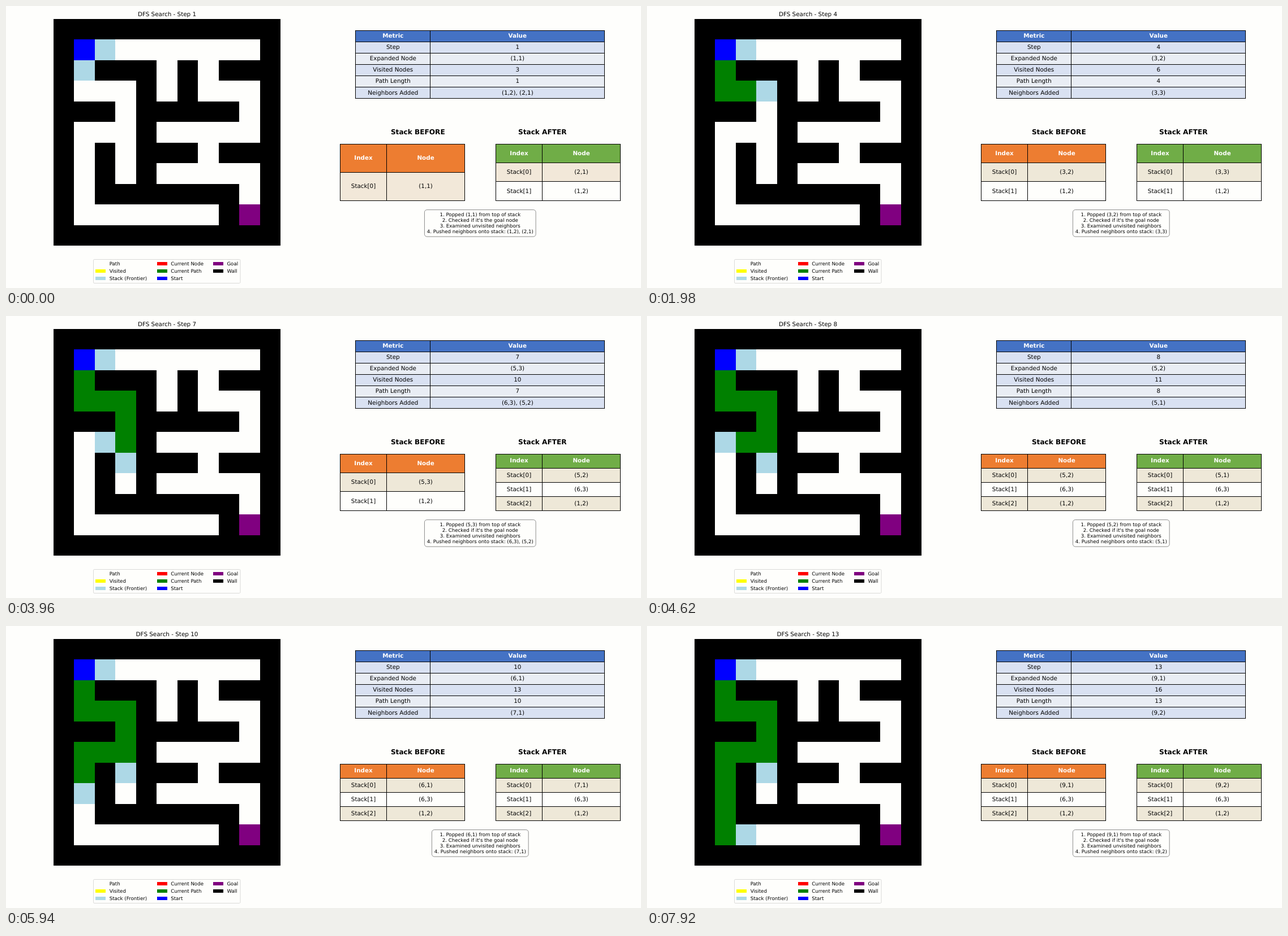
An HTML page with a canvas for the animation above (8 s loop, 1122x499 px).

```html
<!DOCTYPE html>
<html lang="en">
<head>
<meta charset="utf-8">
<title>DFS Search</title>
<style>
html, body { margin: 0; width: 100%; height: 100%; overflow: hidden; background: #fefefc; }
canvas { display: block; }
</style>
</head>
<body>
<canvas id="stage" width="1122" height="499"></canvas>
<script>
const ctx = document.getElementById('stage').getContext('2d');
const PAPER = '#fefefc';
const LOOP = 8000, STEP_MS = 660, STEPS = 13;
const PT = 0.8657;           // pixels per point
const SMALL = 10 * PT, BODY = 12 * PT, HEAD = 14 * PT;

const MAZE = [
  '###########',
  '#.........#',
  '#.###.#.###',
  '#...#.#...#',
  '###.#####.#',
  '#...#.....#',
  '#.#.###.###',
  '#.#.#.....#',
  '#.#######.#',
  '#.......#G#',
  '###########'
];
const MOVES = [[0, 1], [1, 0], [0, -1], [-1, 0]];
const name = ([r, c]) => `(${r},${c})`;

// Depth-first search, recording every step. The top of the stack comes first.
function search() {
  let stack = [[1, 1]];
  const seen = new Set(['(1,1)']), path = [], log = [];
  for (let n = 1; n <= STEPS; n++) {
    const before = stack, node = stack[0];
    const added = MOVES.map(([dr, dc]) => [node[0] + dr, node[1] + dc])
      .filter(p => MAZE[p[0]][p[1]] !== '#' && !seen.has(name(p)));
    added.forEach(p => seen.add(name(p)));
    path.push(node);
    stack = [...added].reverse().concat(stack.slice(1));
    log.push({ n, node, before, after: stack, path: [...path],
               visited: seen.size, added: added.map(name).join(', ') });
  }
  return log;
}
const log = search();

function text(str, x, y, size, align = 'center', bold = false, color = '#000') {
  ctx.font = `${bold ? 'bold ' : ''}${size}px "DejaVu Sans", sans-serif`;
  ctx.textAlign = align;
  ctx.fillStyle = color;
  ctx.fillText(str, x, y);
}

function rect(x, y, w, h, color) {
  ctx.fillStyle = color;
  ctx.fillRect(x, y, w, h);
}

function roundBox(x, y, w, h, r, edge) {
  ctx.beginPath();
  ctx.roundRect(x, y, w, h, r);
  ctx.fillStyle = PAPER;
  ctx.fill();
  ctx.strokeStyle = edge;
  ctx.lineWidth = 0.9;
  ctx.stroke();
}

function cell(r, c, color) {
  const px = k => Math.round(84 + k * 36.45), py = k => Math.round(23 + k * 36.45);
  rect(px(c), py(r), px(c + 1) - px(c), py(r + 1) - py(r), color);
}

function drawMaze(s) {
  text(`DFS Search - Step ${s.n}`, 284.5, 18, BODY);
  MAZE.forEach((row, r) => [...row].forEach((ch, c) =>
    cell(r, c, ch === '#' ? '#000' : ch === 'G' ? '#800080' : PAPER)));
  s.after.forEach(p => cell(...p, '#add8e6'));
  s.path.forEach(p => cell(...p, '#008000'));
  cell(1, 1, '#0000ff');
}

function table(x, y, w, h, split, rows, head, fills) {
  const rh = h / rows.length, mid = x + w * split;
  const left = Math.floor(x), top = Math.floor(y);
  const right = Math.floor(x + w), bottom = Math.floor(y + h);
  rows.forEach((row, i) => {
    const y0 = Math.floor(y + i * rh), y1 = Math.floor(y + (i + 1) * rh);
    rect(left, y0, right - left, y1 - y0, i ? fills[(i - 1) % 2] : head);
    const base = y + (i + 0.5) * rh + 0.276 * BODY;
    const color = i ? '#000' : '#fff';
    text(row[0], (x + mid) / 2, base, BODY, 'center', !i, color);
    text(row[1], (mid + x + w) / 2, base, BODY, 'center', !i, color);
  });
  for (let i = 0; i <= rows.length; i++)
    rect(left, Math.floor(y + i * rh), right - left + 1, 1, '#000');
  for (const v of [left, Math.floor(mid), right])
    rect(v, top, 1, bottom - top + 1, '#000');
}

function drawMetrics(s) {
  table(617.8, 43.2, 440, 120.5, 0.3, [
    ['Metric', 'Value'],
    ['Step', s.n],
    ['Expanded Node', name(s.node)],
    ['Visited Nodes', s.visited],
    ['Path Length', s.path.length],
    ['Neighbors Added', s.added]
  ], '#4472c4', ['#d9e1f2', '#e9edf4']);
}

function drawStack(title, x, titleX, stack, head, tint) {
  text(title, titleX, 227.2, HEAD, 'center', true);
  const rows = stack.map((p, i) => [`Stack[${i}]`, name(p)]);
  table(x, 244, 220, 100.4, 0.375, [['Index', 'Node'], ...rows], head, [tint, PAPER]);
}

function drawNotes(s) {
  const lines = [
    `1. Popped ${name(s.node)} from top of stack`,
    "2. Checked if it's the goal node",
    '3. Examined unvisited neighbors',
    `4. Pushed neighbors onto stack: ${s.added}`
  ];
  const cx = 837.8, pad = SMALL / 2;
  ctx.font = `${SMALL}px "DejaVu Sans", sans-serif`;
  const w = ctx.measureText(lines[3]).width + 2 * pad;
  roundBox(cx - w / 2, 360.6, w, 47.5, pad, '#808080');
  lines.forEach((line, i) => text(line, cx, 371.8 + i * 10.05, SMALL));
}

const LEGEND = [
  [158, 182.7, [['Path', PAPER], ['Visited', '#ffff00'], ['Stack (Frontier)', '#add8e6']]],
  [267, 291.2, [['Current Node', '#ff0000'], ['Current Path', '#008000'], ['Start', '#0000ff']]],
  [366, 390.4, [['Goal', '#800080'], ['Wall', '#000']]]
];

function drawLegend() {
  roundBox(154.5, 448.5, 259.5, 42, 1.7, '#d6d6d5');
  for (const [x, tx, items] of LEGEND)
    items.forEach(([label, color], i) => {
      rect(x, 453 + i * 13, 18, 6, color);
      text(label, tx, 459.2 + i * 13.1, SMALL, 'left');
    });
}

function draw(t) {
  const s = log[Math.min(STEPS - 1, Math.floor((t % LOOP) / STEP_MS))];
  const tint = s.n === 1 ? '#f2e8d9' : '#eee8d8';
  rect(0, 0, 1122, 499, PAPER);
  drawMaze(s);
  drawLegend();
  drawMetrics(s);
  drawStack('Stack BEFORE', 590.3, 727.8, s.before, '#ed7d31', tint);
  drawStack('Stack AFTER', 865.3, 947.8, s.after, '#70ad47', tint);
  drawNotes(s);
}

ctx.textRendering = 'geometricPrecision';
const start = performance.now();
function tick() {
  draw(performance.now() - start);
  requestAnimationFrame(tick);
}
tick();
</script>
</body>
</html>
```
